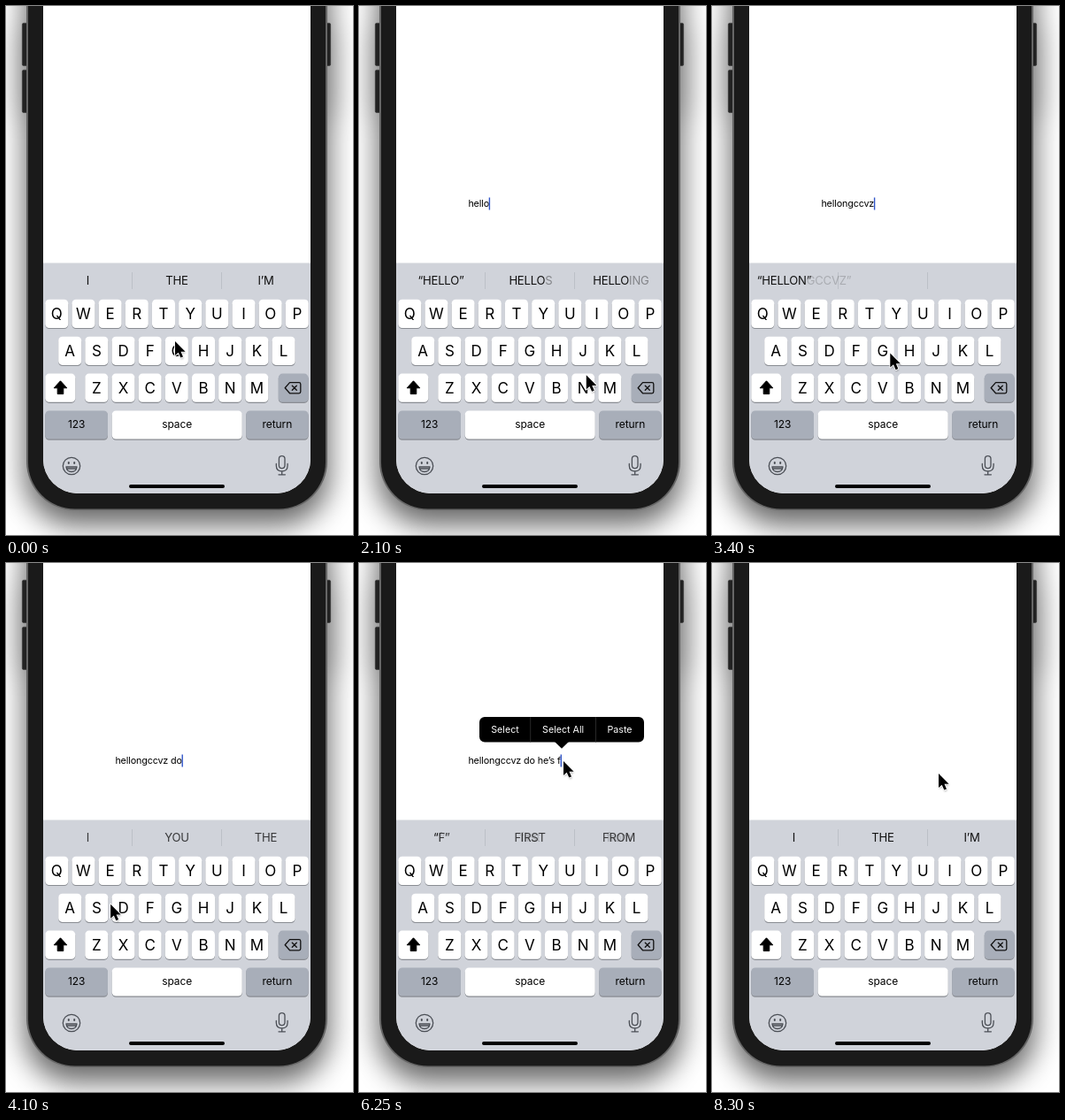
An HTML page for the animation above (8.55 s loop, 392 by 598 pixels).

```html
<!DOCTYPE html>
<html lang="en">
<head>
<meta charset="utf-8">
<title>Typing on a phone</title>
<style>
  html, body { margin: 0; width: 100%; height: 100%; overflow: hidden; background: #fff; }
  svg { display: block; width: 392px; height: 598px; }
  text { font-family: Inter, Roboto, sans-serif; white-space: pre; fill: #000; }
  .mid { text-anchor: middle; }
  .letter { font-size: 17px; }
  .label { font-size: 12px; letter-spacing: -.05px; }
  .hint { font-size: 13.1px; letter-spacing: -.25px; fill: #111; }
  .typed { font-size: 10.8px; letter-spacing: -.16px; }
  .menu { font-size: 10.7px; fill: #fff; }
  .line { fill: none; stroke: #4b4f56; stroke-width: 1.3; stroke-linecap: round; stroke-linejoin: round; }
</style>
</head>
<body>
<svg viewBox="0 0 392 598" xmlns="http://www.w3.org/2000/svg">
  <defs>
    <filter id="blur" x="-30%" y="-30%" width="160%" height="160%"><feGaussianBlur stdDeviation="16"/></filter>
    <filter id="soft" x="-50%" y="-50%" width="200%" height="200%"><feGaussianBlur stdDeviation="1.2"/></filter>
    <clipPath id="screen"><rect x="42" y="-100" width="302" height="651" rx="39"/></clipPath>
    <path id="arrow" d="M0 0V16L3.7 12.7L6.3 18.6L9 17.4L6.5 11.7H11.6Z"/>
  </defs>

  <g opacity=".6" filter="url(#blur)">
    <rect x="21" y="-80" width="344" height="667" rx="56"/>
    <rect x="16" y="25" width="354" height="100"/>
  </g>
  <g fill="#222" stroke="#3c3c3c" stroke-width=".8">
    <rect x="18.4" y="19.4" width="7" height="48" rx="1.5"/>
    <rect x="18.4" y="72.4" width="7" height="48" rx="1.5"/>
    <rect x="360" y="19.4" width="6.6" height="48" rx="1.5"/>
  </g>
  <rect x="23" y="-100" width="340" height="670" rx="55" fill="#666"/>
  <rect x="25" y="-100" width="336" height="668.5" rx="53" fill="#1a1a1a"/>

  <g clip-path="url(#screen)">
    <rect x="42" width="302" height="552" fill="#fff"/>
    <rect x="42" y="290.5" width="302" height="262" fill="#d0d3da"/>
  </g>
  <path d="M142.5 301V320M243.5 301V320" stroke="#bcc0c7"/>

  <g id="keys"></g>
  <path d="M61.5 423.8L68.8 431.8H64.8V438.6H58.2V431.8H54.2Z" stroke="#000" stroke-linejoin="round"/>
  <path class="line" style="stroke:#111" d="M320.5 425.6H331Q332.8 425.6 332.8 427.4V436Q332.8 437.8 331 437.8H320.5L315.2 431.7ZM323.3 429.2L328.3 434.2M328.3 429.2L323.3 434.2"/>
  <g class="line">
    <circle cx="74" cy="520" r="9.7"/>
    <path d="M68 521H80Q79.4 526.5 74 526.5T68 521ZM69 523H79"/>
    <path d="M70.8 516V517M77.2 516V517" stroke-width="2"/>
    <rect x="308.4" y="508.6" width="6.6" height="14" rx="3.3"/>
    <path d="M305.3 517.5V519.6Q305.3 526 311.7 526T318.1 519.6V517.5M311.7 526V529.8M308 529.8H315.4"/>
  </g>
  <rect x="139" y="541" width="108" height="4" rx="2"/>

  <g id="hints"></g>
  <rect id="mark" x="123" y="216" height="15" fill="#3f6fe0" opacity=".22"/>
  <text id="typed" class="typed" y="227.3"></text>
  <rect id="caret" y="216.5" width="1.4" height="14" fill="#3156c9"/>
  <g id="menu">
    <rect x="136" y="174" width="186" height="28.6" rx="6"/>
    <path d="M221 202H237L229 209.8Z"/>
    <path d="M193.7 174V202.6M267.5 174V202.6" stroke="#333" stroke-width=".8"/>
  </g>

  <g id="pointer">
    <use href="#arrow" x=".6" y="1.6" opacity=".4" filter="url(#soft)"/>
    <use href="#arrow" stroke="#fff" stroke-width="1.8" paint-order="stroke" stroke-linejoin="round"/>
  </g>
</svg>
<script>
const LOOP = 8550, TICK = 50, FADE = 250, PRESS = 150, LEFT = 123.4;
const TAP = 6200, SELECT = 7050, CLEAR = 7700;
const $ = id => document.getElementById(id);
const clamp = v => Math.min(1, Math.max(0, v));
const mix = (a, b, p) => a + (b - a) * p;
const smooth = p => p * p * (3 - 2 * p);
const indexAt = (list, t) => list.findLastIndex(s => s[0] <= t);

function add(parent, tag, attrs, text = "") {
  const el = document.createElementNS("http://www.w3.org/2000/svg", tag);
  set(el, attrs);
  el.textContent = text;
  return parent.appendChild(el);
}
function set(el, attrs) {
  for (const k in attrs) el.setAttribute(k, attrs[k]);
}

// Keyboard; keyAt remembers where the pointer tip rests on each letter
const keyAt = {}, GREY = "#a8aeb9";
function key(x, y, w, label, cls = "letter", fill = "#fff") {
  const box = { x, width: w, height: 32.2, rx: 4.5 };
  add($("keys"), "rect", { ...box, y: y + 1.1, fill: "#898c92" });
  add($("keys"), "rect", { ...box, y, fill });
  add($("keys"), "text", { class: cls + " mid", x: x + w / 2, y: y + (cls === "letter" ? 22.3 : 20) }, label);
  keyAt[label.toLowerCase()] = [x + w / 2 - 2, y + 12];
}
["QWERTYUIOP", "ASDFGHJKL", "ZXCVBNM"].forEach((letters, r) =>
  [...letters].forEach((c, i) => key([44.3, 59.2, 89.3][r] + i * 30.17, 331.8 + r * 41.9, 26, c)));
key(44.3, 415.6, 34, "");
key(307.8, 415.6, 33.7, "", "letter", GREY);
key(44.3, 457.4, 70.7, "123", "label", GREY);
key(119.7, 457.4, 147, "space", "label");
key(271.2, 457.4, 70.3, "return", "label", GREY);

// Words: start, end, keys visited, and the text a swipe adds at its end
const words = [
  [300, 1800, "hello"], [2150, 3150, "ngccvz"],
  [3450, 3800, "hdo", " do"], [3900, 4030, "hes", " he’s"], [4150, 4150, "f", " f"]
];
const stops = [[0, 191, 379]], typing = [[0, ""]], edits = [[-1000]];

// Far keys take longer to reach
for (const [from, to, route, swipe] of words) {
  const spots = [...route].map(c => keyAt[c]);
  const reach = [0];
  spots.slice(1).forEach(([x, y], i) => reach.push(reach[i] + 150 + Math.hypot(x - spots[i][0], y - spots[i][1])));
  const total = reach.at(-1) || 1;
  spots.forEach((spot, i) => {
    const t = mix(from, to, reach[i] / total);
    stops.push([t, ...spot]);
    const more = !swipe ? route[i] : i === spots.length - 1 ? swipe : "";
    typing.push([t + PRESS, typing.at(-1)[1] + more]);
    edits.push([t + PRESS]);
  });
}
stops.push(
  [4550, 183, 385], [5200, 288, 366], [5450, 253, 328], [5650, 238, 262], [6150, 231, 224],
  [6750, 275, 230], [7000, 232, 188], [7500, 307, 450], [7950, 256, 238], [LOOP, 256, 238]
);
typing.push([CLEAR, ""]);
edits.push([TAP], [CLEAR]);

// Suggestions are in capitals until the caret is tapped
const hints = [
  [0, "i the i’m"], [450, "“h” have he"], [850, "“he” hey her"], [1400, "“hel” help held"],
  [1600, "“hell” hello hello"], [1850, "“hello” hello hello"], [2000, "“hello” hellos helloing"],
  [2300, "“hellon”"], [3350, "“hellongccvz”"], [3600, ""], [3900, "i you the"],
  [4300, "“f” first from"], [TAP, "“f” first from"], [SELECT, ""], [CLEAR, "i the i’m"]
].map(([t, line]) => [t, (t >= TAP && t < CLEAR ? line : line.toUpperCase()).split(" ")]);

function put(el, text) {
  if (el.textContent !== text) el.textContent = text;
  return text ? el.getComputedTextLength() : 0;
}

// The shared start of two suggestions slides; the rest fades
const slots = [92.5, 193, 293.5].map(x => ({
  x, parts: [0, 1, 2].map(() => add($("hints"), "text", { class: "hint", y: 315 }))
}));
function drawHint({ x, parts: [same, before, after] }, from, to, p) {
  let n = 0;
  while (n < to.length && from[n] === to[n]) n++;
  const w = put(same, to.slice(0, n));
  const a = x - (w + put(before, from.slice(n))) / 2;
  const b = x - (w + put(after, to.slice(n))) / 2;
  const left = mix(a, b, 1 - (1 - p) ** 3);
  set(same, { x: left });
  set(before, { x: n ? left + w : a, opacity: 1 - p });
  set(after, { x: n ? left + w : b, opacity: p });
}

const items = [165, 230.6, 294.5].map(x => add($("menu"), "text", { class: "mid menu", x, y: 192.2 }));
const show = (el, on) => set(el, { visibility: on ? "visible" : "hidden" });

function drawPointer(t) {
  const i = Math.min(indexAt(stops, t), stops.length - 2);
  const [t0, x0, y0] = stops[i], [t1, x1, y1] = stops[i + 1];
  const p = smooth(clamp(((t - t0) / (t1 - t0) - .35) / .65));
  set($("pointer"), { transform: `translate(${mix(x0, x1, p)} ${mix(y0, y1, p)})` });
}

// The caret restarts its blink at every edit
function glow(t) {
  const s = (t - edits[indexAt(edits, t)][0]) % 1250;
  return s < 800 ? clamp((600 - s) / 100) : clamp((s - 1050) / 200);
}

function draw(t) {
  const width = put($("typed"), typing[indexAt(typing, t)][1]);
  const picked = t >= SELECT && t < CLEAR;
  set($("typed"), { x: LEFT });
  set($("caret"), { x: LEFT + width - .3, opacity: picked ? 0 : glow(t) });
  set($("mark"), { width });
  show($("mark"), picked);

  show($("menu"), t >= TAP && t < CLEAR);
  const labels = picked ? ["Cut", "Copy", "Paste"] : ["Select", "Select All", "Paste"];
  items.forEach((el, k) => put(el, labels[k]));

  const i = indexAt(hints, t), now = hints[i], last = hints[Math.max(i - 1, 0)];
  const p = clamp((t - now[0]) / FADE);
  slots.forEach((s, k) => drawHint(s, last[1][k] || "", now[1][k] || "", i ? p : 1));
  drawPointer(t);
}

const start = performance.now();
function frame() {
  const t = (performance.now() - start) % LOOP;
  draw(Math.floor(t / TICK) * TICK);
  requestAnimationFrame(frame);
}
frame();
</script>
</body>
</html>
```
